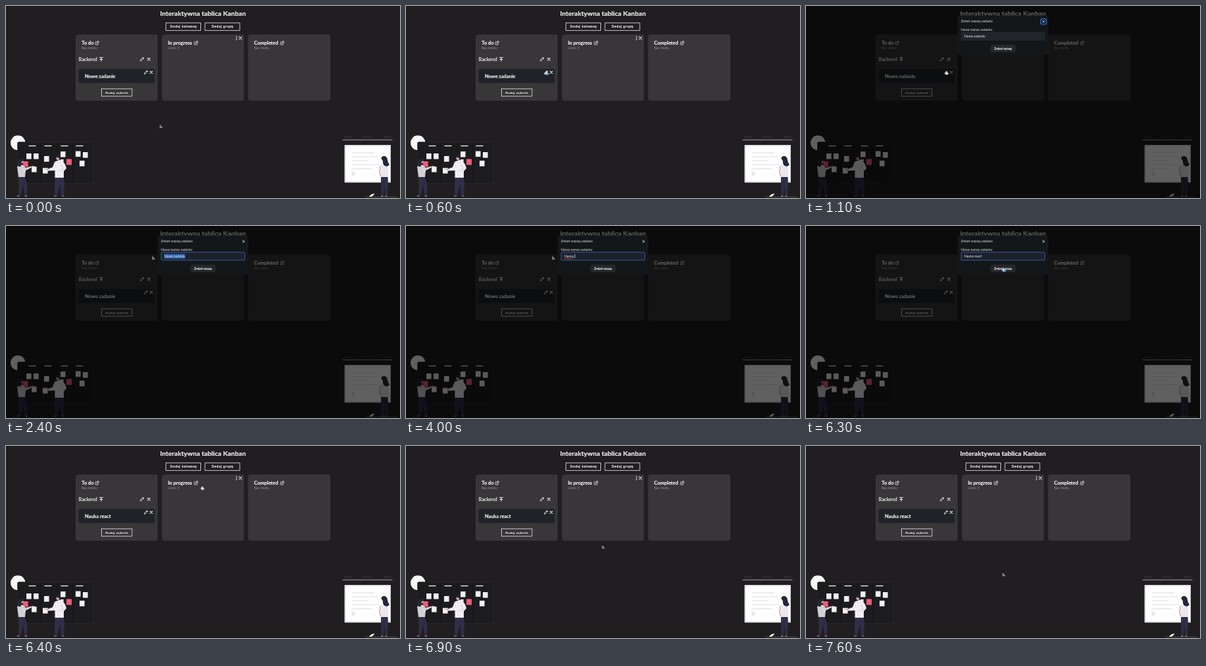
An HTML page for the animation above (7.7 s loop, 600 by 293 pixels).

```html
<!DOCTYPE html>
<html lang="pl">
<head>
<meta charset="utf-8">
<title>Kanban</title>
<style>
  html, body { margin: 0; width: 100%; height: 100%; overflow: hidden; background: #201e20; }
  svg { position: absolute; left: 0; top: 0; width: 600px; height: 293px; }
  text { font-family: Lato, "Open Sans", sans-serif; white-space: pre; }
  .b { font-weight: 700; }
  .blur { filter: blur(.75px); }
  .line { fill: none; stroke: #eee; stroke-width: .9; stroke-linecap: round; stroke-linejoin: round; }
</style>
</head>
<body>
<svg id="page" viewBox="0 0 600 293"></svg>
<svg id="top" viewBox="0 0 600 293">
  <g id="dialog">
    <rect width="600" height="293" fill="#000" opacity=".62"/>
    <rect x="231" y="14.5" width="138" height="60.5" rx="3.5" fill="#14171a"/>
    <text x="236" y="25.4" font-size="5.15" fill="#dedfe0">Zmień nazwę zadania</text>
    <text x="236" y="37.6" font-size="5.1" fill="#dedfe0">Nowa nazwa zadania:</text>
    <rect id="ring" x="357.5" y="19.5" width="8.5" height="8.5" rx="1.8" fill="#0c1b33" stroke="#3f7be0" stroke-width="1.1"/>
    <path class="line" d="M360.4 22.2l2.8 2.8m0-2.8l-2.8 2.8"/>
    <rect id="field" x="236.3" y="40" width="127.4" height="12.2" rx="1.5" stroke-width=".9"/>
    <rect id="pick" y="42.6" x="241" height="7.2" fill="#2c63ad"/>
    <text id="value" x="241" y="48" font-size="5.1" fill="#eceef0"></text>
    <path id="wavy" d="M241 49.7q1-.9 2 0t2 0 2 0 2 0 2 0 2 0 2 0" fill="none" stroke="#d8434a" stroke-width=".8"/>
    <path id="caret" d="M0 43v6" stroke="#fff" stroke-width=".7"/>
    <rect x="281" y="59" width="38" height="11.6" rx="2.5" fill="#25282b"/>
    <text class="b" x="300" y="66.6" font-size="4.6" fill="#fff" text-anchor="middle">Zmień nazwę</text>
  </g>
  <g id="cursor">
    <path id="arrow" d="M-1.3-2.3v4.4l1.2-.9 2.1.2z" fill="#29272a" stroke="#e8e8e8" stroke-width=".7"/>
    <path id="beam" d="M-1-3h2M0-3v6M-1 3h2" fill="none" stroke="#ddd" stroke-width=".7"/>
    <path id="hand" d="M-.9-2.6q.9-.7 1.2.3v1.1l2 .6q.7.5.5 1.6l-.6 2h-3.2l-1.8-2.6q0-1.100 1.100-.6z" fill="#f4f4f4" stroke="#222" stroke-width=".3"/>
    <circle id="busy" cx="1.6" cy="1.6" r="1.7" fill="#2f8fd8" stroke="#9ad0f5" stroke-width=".5"/>
  </g>
</svg>
<script>
const $ = id => document.getElementById(id);
const rect = (x, y, w, h, fill, extra = '') =>
  `<rect x="${x}" y="${y}" width="${w}" height="${h}" fill="${fill}" ${extra}/>`;
const text = (x, y, size, str, fill = '#eee', extra = '') =>
  `<text x="${x}" y="${y}" font-size="${size}" fill="${fill}" stroke="${fill}" stroke-width=".2" ${extra}>${str}</text>`;
const shape = (d, fill) => `<path d="${d}" fill="${fill}"/>`;
const circle = (x, y, r, fill) => `<circle cx="${x}" cy="${y}" r="${r}" fill="${fill}"/>`;
const line = (d, color = '#eee', w = .9) =>
  `<path class="line" d="${d}" style="stroke:${color};stroke-width:${w}"/>`;

const cross = (x, y) => line(`M${x - 1.9} ${y - 1.9}l3.8 3.8m0-3.8l-3.8 3.8`, '#eee', 1.1);
const pencil = (x, y) =>
  line(`M${x - 2.4} ${y + 2.4}l.4-1.6 2.9-2.900 1.300 1.300-2.900 2.900z`) +
  line(`M${x + 1.8} ${y - 2}l.4.4`, '#eee', 1.7);
const edit = (x, y) =>
  line(`M${x - .2} ${y - 1.6}h-2.200v4.100h4.100v-2`, '#ddd', .8) +
  line(`M${x - .6} ${y + .7}l3-3m-1.700-.1h1.800v1.800`, '#eee', .9);
const button = (x, y, w, h, label, size, gap) =>
  rect(x + .5, y + .5, w - 1, h - 1, 'none', 'stroke="#d8d8d8" stroke-width=".9"') +
  text(x + w / 2 + gap / 2, y + h / 2 + 1.7, size, label, '#eee',
    `class="b" text-anchor="middle" letter-spacing="${gap}"`);

function column(x, w, title, limit, iconX, r) {
  return shape(`M${x + 5} 43.5H${x + w - r}q${r} 0 ${r} ${r}V${144.5 - r}q0 ${r} ${-r} ${r}H${x + 5}q-5 0-5-5V48.5q0-5 5-5z`, '#383638') +
    text(x + 9.3, 59, 7.5, title, '#f0f0f0', 'class="b"') +
    text(x + 9.3, 65.6, 4.7, limit, '#7c7a7c', 'letter-spacing=".28"') + edit(iconX, 56.4);
}

const SKIN = '#d9a0a4', HAIR = '#25243a', NAVY = '#2f2e48', PINK = '#f25a7b';

function team() {
  const notes = [[31, 225], [42, 225], [58, 229], [39, 245], [56, 247], [83, 222], [80, 234], [106, 221.5], [117, 223], [112, 236]];
  return circle(18.2, 208.8, 11.2, '#fbfafb') +
    rect(17.5, 207.5, 115, 63.5, '#1c1b1d', 'rx="2" stroke="#2e2c2f" stroke-width=".7"') +
    [53, 78, 102].map(x => line(`M${x} 211v56`, '#121113', .8)).join('') +
    [35, 59, 84, 107].map(x => line(`M${x} 213.5h10`, '#e4e4e4', 1.4)).join('') +
    notes.map(([x, y]) => rect(x, y, 7.6, 8.6, '#f1eef0')).join('') +
    rect(26, 237, 7.6, 8.6, PINK) + rect(92, 233.5, 8, 9, PINK) +
    // woman
    shape('M19 260h10l3 13v17h-3.500l-2.500-17-4 17h-3.500l1-17z', NAVY) +
    shape('M17 245q4-4 9-2l4 4 8-2.500 1 2-9 4.500-1 10H19z', '#d3d0d6') +
    line('M38 245.500l4-1', SKIN, 1.5) + circle(23.5, 237.3, 2.8, SKIN) +
    shape('M17.500 240q0-7 6-7 4 0 4 3-4 0-4 3l-1 6q-6 1-5-5z', HAIR) +
    line('M17 290h3M29 290h3', '#d68a9a', 1) +
    // man
    shape('M75 261h13l1 11-1 18h-3.500l-2.500-17-4 17h-3.500l-.5-18z', NAVY) +
    shape('M74 238q6-4 11-1 6 3 7 11l-4 4v10H74.500v-11l-11 .5-.5-2.500 8-3z', '#efedf0') +
    line('M64 249.500l-5-1.500', SKIN, 1.5) + line('M84 242l3 7-7 3', '#b9b7bd', .6) +
    circle(79.5, 232, 3.2, SKIN) +
    shape('M75.500 231q1-4 5-3.500 4 1 3 7l-2 1-1-4z', HAIR) +
    line('M73.500 290h3M85 290h3', '#8c8a9a', 1);
}

function certificate() {
  const rows = [[224, 34], [230, 39], [236, 25], [242, 39], [248.5, 29]];
  const dots = [517, 521, 525, 577, 581, 585];
  return dots.map(x => circle(x, 200, 1.2, '#403e4b')).join('') +
    line('M542 200h14', '#39373d', 1) + line('M513 204.3h75', '#a9a8ab', 1) +
    rect(515.5, 212, 70.5, 57.5, '#e6e4e8', 'rx="1"') +
    rect(517.5, 214, 66.5, 53.5, '#fefdff') +
    rows.map(([y, w]) => line(`M527 ${y}h${w}`, '#d6d4d9', .8)).join('') +
    '<circle cx="529" cy="256" r="2.3" fill="#f3f2f5" stroke="#b8b6bb" stroke-width=".6"/>' +
    shape('M571 260h10.500l.5 12-1.500 18h-3l-1-18-2 18h-3l-.5-18z', NAVY) +
    shape('M570 243q5-3 10-1 3 5 2 19h-11.500q-3-9-.5-18z', '#e9e7eb') +
    line('M569.500 245l-1 9 2 5', SKIN, 1.3) + circle(575, 234, 2.8, SKIN) +
    shape('M571.500 233q0-4 4.500-4 4.500.5 5 6 .5 4 3 7-3 4-7 2-4-3-3-8z', HAIR) +
    line('M571.500 290h2.500M577.500 290h2.500', '#d68a9a', 1) +
    shape('M553 291q2-4 8-5-1 4-5 5z', '#eeeef0') +
    line('M548 291.5h48', '#5d6a68', .7);
}

$('page').innerHTML =
  rect(0, 0, 600, 293, '#201e20') + rect(0, 0, 600, 1, '#111012') + rect(0, 292, 600, 1, '#121313') +
  text(300, 14.5, 10.25, 'Interaktywna tablica Kanban', '#f0f0f0', 'class="b" text-anchor="middle"') +
  button(243, 25.3, 54, 12.5, 'Dodaj kolumnę', 4.6, .75) +
  button(302.5, 25.3, 54, 12.5, 'Dodaj grupę', 4.6, .75) +
  column(106, 125, 'To do', 'Bez limitu', 138.5, 2) +
  column(237.3, 125, 'In progress', 'Limit: 3', 289.3, 2) +
  column(368.5, 125.5, 'Completed', 'Bez limitu', 420.5, 4) +
  [46.6, 49, 51.4].map(y => circle(351, y, .8, '#eee')).join('') + cross(357, 49) +
  text(110.6, 83.6, 7.5, 'Backend') +
  line('M142.5 78.5h5M145 84v-3.6m-1.7 1.5l1.7-1.7 1.7 1.7', '#eee', 1.1) +
  pencil(207, 81.2) + cross(217.5, 81.2) +
  rect(110.5, 96, 115.8, 21.5, '#1f2226', 'rx="3"') +
  text(120, 109.6, 7.4, '', '#f0f0f0', 'class="b" id="task"') +
  pencil(213, 101.2) + cross(221.2, 101.2) +
  button(145, 125.8, 47.4, 12.4, 'Dodaj zadanie', 4.2, .65) +
  team() + certificate();

const LOOP = 7700, STEP = 100, OPEN = 1100, FOCUS = 1900, CLOSE = 6400;
const OLD = 'Nowe zadanie', NEW = 'Nauka react';

// cursor stops: time, x, y
const path = [[0, 236, 184], [600, 214, 102], [1100, 214, 102], [1700, 274, 47], [1900, 274, 47],
  [2400, 224.5, 49], [5600, 224.5, 49], [6200, 301, 66.5], [6300, 301, 66.5], [6400, 299, 64], [7200, 301, 196.5], [7700, 301, 196.5]];
// times at which each next letter count appears
const keys = [[2900, 1], [3400, 2], [3500, 3], [3600, 4], [3700, 5], [4000, 6], [4700, 7], [4800, 8], [4900, 9], [5000, 10], [5300, 11]];

function cursorAt(t) {
  const i = path.findIndex(p => p[0] > t);
  const [t0, x0, y0] = path[i - 1], [t1, x1, y1] = path[i];
  const u = (t - t0) / (t1 - t0), e = u * u * (3 - 2 * u);
  return [x0 + (x1 - x0) * e, y0 + (y1 - y0) * e];
}

const within = (t, a, b) => t >= a && t < b;
const show = (id, on) => { $(id).style.display = on ? '' : 'none'; };

function draw(t) {
  const open = within(t, OPEN, CLOSE), focus = t >= FOCUS;
  const count = keys.filter(k => k[0] <= t).length;
  const value = count ? NEW.slice(0, keys[count - 1][1]) : OLD;
  show('dialog', open);
  $('page').classList.toggle('blur', open);
  $('task').textContent = t < CLOSE ? OLD : NEW;
  $('value').textContent = value;

  show('ring', !focus);
  $('field').setAttribute('fill', focus ? '#1c212a' : '#22262a');
  $('field').setAttribute('stroke', focus ? '#3766ad' : '#22262a');
  show('wavy', within(t, 4000, 4700));
  show('caret', within(t, 2900, 5700));
  if (open) {
    const end = 241 + $('value').getComputedTextLength();
    $('caret').setAttribute('transform', `translate(${end + .4})`);
    const from = Math.max(241, Math.min(end, cursorAt(t)[0]));
    show('pick', focus && !count);
    $('pick').setAttribute('x', from);
    $('pick').setAttribute('width', end - from);
  }

  const [x, y] = cursorAt(t);
  $('cursor').setAttribute('transform', `translate(${x} ${y})`);
  const hand = within(t, 500, 1200) || within(t, 6100, 6500);
  const beam = within(t, 1600, 2400);
  show('hand', hand);
  show('beam', beam);
  show('arrow', !hand && !beam);
  show('busy', within(t, 600, OPEN) || within(t, 6300, CLOSE));
}

const start = performance.now();
function tick() {
  const t = (performance.now() - start) % LOOP;
  draw(Math.floor(t / STEP) * STEP);
  requestAnimationFrame(tick);
}
tick();
</script>
</body>
</html>
```
